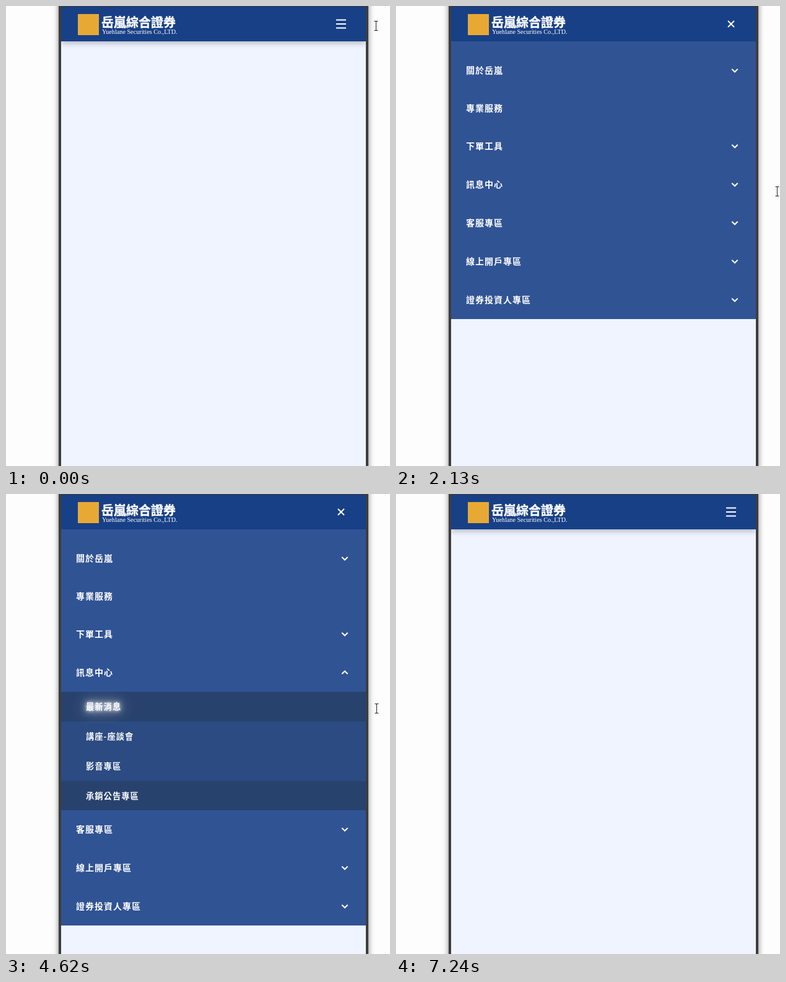
An HTML page that plays this animation: 620x742 px, repeating every 7530 ms.

```html
<!DOCTYPE html>
<html lang="zh-Hant">
<head>
<meta charset="utf-8">
<title>Mobile menu</title>
<style>
  html, body { margin: 0; width: 100%; height: 100%; overflow: hidden; background: #fdfdfd; }
  svg { display: block; }
  text { fill: #fff; font-family: "Noto Sans CJK TC", "Noto Sans CJK JP", "Noto Sans CJK", sans-serif; }
  .item { font-size: 14px; font-weight: 700; letter-spacing: 1px; }
  .sub { font-size: 13.3px; font-weight: 700; letter-spacing: 1px; }
  .brand { font-size: 20px; font-weight: 900; stroke: #fff; stroke-width: .4; }
  .latin { font: 10.2px "Liberation Serif", serif; }
  .line { fill: none; stroke: #fff; stroke-width: 2; }
  .device { filter: drop-shadow(0 0 5px rgba(0, 0, 0, .5)); }
  .bar { filter: drop-shadow(0 3px 5px rgba(0, 0, 0, .25)); }
</style>
</head>
<body>
<svg width="620" height="742" viewBox="0 0 620 742">
  <defs>
    <clipPath id="screen"><rect x="89" y="0" width="492" height="742"/></clipPath>
    <clipPath id="drawer"><rect id="drawerBox" x="89" y="319" width="492" height="0"/></clipPath>
    <path id="header" d="M89 57V7q0-6 6-6H575q6 0 6 6V57Z" fill="#184086"/>
  </defs>
  <rect class="device" x="85" y="-20" width="500" height="800" fill="#3d3d3d"/>
  <g clip-path="url(#screen)">
    <rect x="89" y="30" width="492" height="712" fill="#eff4ff"/>
    <use class="bar" href="#header"/>
    <g id="menu">
      <rect id="panel" x="89" y="30" width="492" fill="#305394"/>
      <rect id="openRow" x="89" y="257" width="492" height="62" fill="#28426e"/>
      <g id="subs" clip-path="url(#drawer)"><rect x="89" y="319" width="492" height="192" fill="#2b4b82"/></g>
      <g id="items"></g>
    </g>
    <use href="#header"/>
    <rect x="116" y="13" width="34" height="34" fill="#e8a934"/>
    <text class="brand" x="154" y="34">岳嵐綜合證券</text>
    <text class="latin" x="155" y="45">Yuehlane Securities Co.,LTD.</text>
    <path id="burger" class="line" d="M-8-6.5H8M-8 0H8M-8 6.5H8"/>
    <path id="cross" class="line" d="M-5-5L5 5M5-5L-5 5"/>
  </g>
  <g id="cursor">
    <path id="beam" d="M-3-7.5H3M0-7.5V7.5M-3 7.5H3" fill="none" stroke="#222"/>
    <path id="hand" fill="#fff" stroke="#000" stroke-linejoin="round"
      d="M-1.5 1.5Q0-1 1.5 1.5V7Q3 5.5 4.5 7.5Q6 6 7.5 8.5Q9.5 7.5 9.5 10V14Q9 16 8 17V19.5H0V17Q-3 13-4 11Q-4 8.5-1.5 11Z"/>
  </g>
</svg>
<script>
const LOOP = 7530, OPEN = 585, CLOSE = 6600, DRAWER = 191, EXPANDED = 3;
const items = ["關於岳嵐", "專業服務", "下單工具", "訊息中心", "客服專區", "線上開戶專區", "證券投資人專區"];
const subs = ["最新消息", "講座-座談會", "影音專區", "承銷公告專區"];
// Pointer moves; x = 660 lies outside the stage, no length means a jump
const moves = [
  { at: 0, x: 597, y: 32 },
  { at: 20, length: 320, x: 551, y: 29 },
  { at: 1300, length: 120, x: 606, y: 38 },
  { at: 1420, x: 660, y: 299 },
  { at: 2110, x: 615, y: 299 },
  { at: 2130, length: 530, x: 560, y: 304 },
  { at: 2960, length: 740, x: 544, y: 445 },
  { at: 3750, length: 410, x: 543, y: 488 },
  { at: 4320, length: 150, x: 562, y: 350 },
  { at: 4500, length: 120, x: 598, y: 346 },
  { at: 4660, x: 660, y: 23 },
  { at: 5690, x: 612, y: 23 },
  { at: 5700, length: 660, x: 549, y: 34 },
  { at: 6900, length: 320, x: 608, y: 26 },
  { at: 7230, x: 660, y: 26 }
];

const $ = id => document.getElementById(id);
const set = (node, values) => Object.entries(values).forEach(([key, value]) => node.setAttribute(key, value));
const clamp = v => Math.max(0, Math.min(1, v));
const ramp = (t, start, length) => clamp((t - start) / length);
const smooth = u => u * u * (3 - 2 * u);
const fade = (t, start) => 1 - (1 - ramp(t, start, 420)) ** 1.8;
// Critically damped spring from 0 to 1
const spring = (t, start) => {
  const x = Math.max(0, t - start) / 95;
  return 1 - (1 + x) * Math.exp(-x);
};
const itemY = i => 102 + 62 * i + Math.max(0, 2 - i);
const subY = i => 343 + 48 * i;

$("items").innerHTML = items.map((label, i) => `<g>
  <text class="item" x="113" y="${itemY(i) + 5.4}">${label}</text>
  ${i === 1 ? "" : `<path class="line" d="M-4.7-2.3L0 2.3L4.7-2.3" transform="translate(547 ${itemY(i)})"/>`}</g>`).join("");
$("subs").innerHTML += subs.map((_, i) =>
  `<rect class="shade" x="89" y="${subY(i) - 24}" width="492" height="48" fill="#28426e"/>`).join("") +
  subs.map((label, i) => `<text class="sub" x="129" y="${subY(i) + 5}">${label}</text>`).join("");
const rows = [...$("items").children];
const shades = [...$("subs").querySelectorAll(".shade")];
const labels = [...$("subs").querySelectorAll("text")];
const chevron = rows[EXPANDED].querySelector("path");

function pointerAt(t) {
  let pos = moves[0];
  for (const move of moves) {
    if (t < move.at) break;
    const u = move.length ? smooth(ramp(t, move.at, move.length)) : 1;
    pos = { x: pos.x + (move.x - pos.x) * u, y: pos.y + (move.y - pos.y) * u };
  }
  return pos;
}

function drawMenu(t, pointer) {
  const closing = t >= CLOSE;
  const opacity = closing ? 1 - fade(t, CLOSE) : fade(t, OPEN);
  const shown = closing ? 1 - spring(t, CLOSE) : spring(t, OPEN);
  set($("menu"), { opacity, transform: `translate(0 ${-20 * (1 - shown)})` });

  const expanded = smooth(ramp(t, 2270, 390)) * (1 - smooth(ramp(t, 4630, 410)));
  const height = DRAWER * expanded;
  set($("panel"), { height: 475 + height });
  set($("drawerBox"), { height });
  set($("openRow"), { opacity: ramp(t, 2260, 200) * (1 - ramp(t, 4480, 130)) });
  rows.forEach((row, i) => set(row, { transform: `translate(0 ${i > EXPANDED ? height : 0})` }));
  set(chevron, { transform: `translate(547 ${itemY(EXPANDED)}) rotate(${180 * expanded})` });

  labels.forEach((label, i) => {
    const outer = i % 3 === 0;
    set(shades[i], { opacity: 1 - ramp(t, outer ? 4615 : 4490, 130) });
    const glow = clamp((30 - Math.abs(pointer.y - subY(i))) / 12);
    label.style.textShadow = [5, 12, 24].map(blur => `0 0 ${blur}px rgba(255,255,255,${0.85 * glow})`).join();
  });
}

function drawIcon(t) {
  const crossed = t >= OPEN && t < CLOSE, resting = t < OPEN;
  const start = crossed ? OPEN : CLOSE;
  const angle = resting ? 0 : (crossed ? -90 : 90) * (1 - spring(t, start));
  set($(crossed ? "burger" : "cross"), { opacity: 0 });
  set($(crossed ? "cross" : "burger"), {
    opacity: resting ? 1 : Math.sqrt(fade(t, start)),
    transform: `translate(541 29) rotate(${angle})`
  });
}

function drawCursor({ x, y }) {
  const outside = x > 581;
  set($("cursor"), { transform: `translate(${Math.round(x) + .5} ${Math.round(y)})` });
  set($("beam"), { opacity: +outside });
  set($("hand"), { opacity: +!outside });
}

function frame() {
  const t = performance.now() % LOOP;
  const pointer = pointerAt(t);
  drawMenu(t, pointer);
  drawIcon(t);
  drawCursor(pointer);
  requestAnimationFrame(frame);
}
frame();
</script>
</body>
</html>
```
